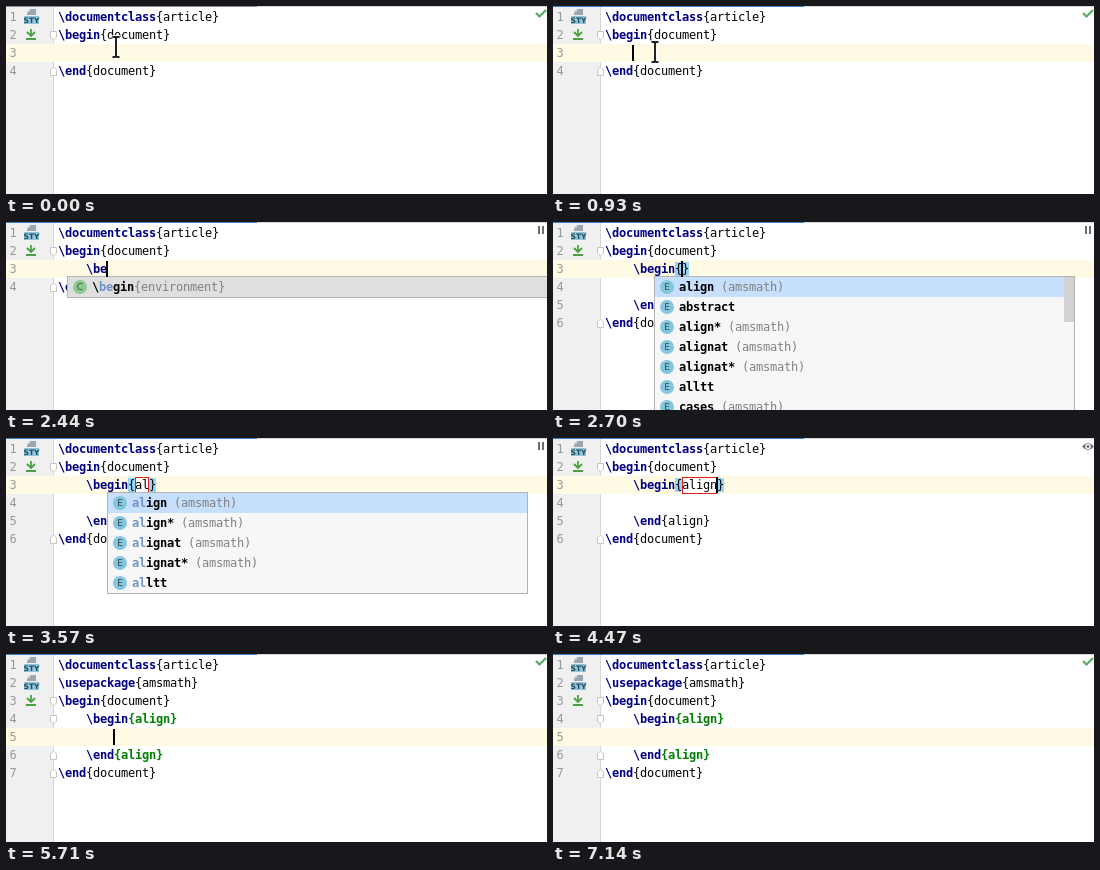
An HTML page for the animation above (7200 ms loop, 541x188 px).

```html
<!DOCTYPE html>
<html lang="en">
<head>
<meta charset="utf-8">
<title>LaTeX editor completion</title>
<style>
html, body { margin: 0; width: 541px; height: 188px; overflow: hidden; background: #fff; }
#stage { position: relative; width: 541px; height: 188px; overflow: hidden; background: #fff;
  font: 12px "DejaVu Sans Mono", monospace; letter-spacing: var(--gap, 0); color: #000; }
#stage div, #stage svg { position: absolute; }
#gutter { left: 0; top: 0; width: 47px; height: 188px; background: #f0f0f0; border-right: 1px solid #d6d6d6; }
#row { left: 0; width: 541px; height: 18px; background: #fffae3; }
#tab { left: 0; top: 0; width: 541px; height: 1px; background: #d3d9de; }
#tab div { width: 251px; height: 1px; }
.line { left: 52px; height: 18px; line-height: 18px; white-space: pre; }
.num { left: 3.5px; height: 18px; line-height: 18px; color: #999; }
b { color: #000080; }
.env { color: #008000; font-weight: bold; }
.brace { background: #99d3f5; }
.field { box-shadow: inset 0 0 0 1px #e02020; background: #fff; display: inline-block; height: 17px; line-height: 17px; }
#caret { width: 2px; height: 16px; background: #000; }
#popup { top: 54px; background: #f7f7f7; border: 1px solid #b4b4b4; box-sizing: border-box; overflow: hidden; }
.item { left: 0; width: 100%; height: 20px; line-height: 20px; white-space: pre; }
.item span { position: absolute; left: 24px; }
.item i { position: absolute; left: 5px; top: 3px; width: 14px; height: 14px; border-radius: 50%;
  font: 9px/14px "DejaVu Sans", sans-serif; letter-spacing: 0; text-align: center; color: #3a474d; }
.item b { color: #000; }
.item em { font-style: normal; color: #6f93c9; }
.item u { text-decoration: none; color: #808080; }
#bar { right: 0; top: 0; width: 10px; height: 45px; background: #d2d2d2; }
</style>
</head>
<body>
<div id="stage">
  <div id="gutter"></div>
  <div id="row"></div>
  <div id="text"></div>
  <svg id="marks" width="541" height="188"></svg>
  <div id="tab"><div></div></div>
  <div id="popup"></div>
  <div id="caret"></div>
  <svg id="mouse" width="14" height="26" viewBox="-7 -13 14 26" fill="none">
    <path id="beam" d="M-3.5-10H-1Q0-10 0-8Q0-10 1-10H3.5M0-9V9M-3.5 10H-1Q0 10 0 8Q0 10 1 10H3.5" stroke="#fff" stroke-width="4"/>
    <use href="#beam"/>
    <path d="M-3.5-10H-1Q0-10 0-8Q0-10 1-10H3.5M0-9V9M-3.5 10H-1Q0 10 0 8Q0 10 1 10H3.5" stroke="#222" stroke-width="2"/>
  </svg>
</div>
<script>
const LOOP = 7200, CELL = 7, ROW = 18;
const $ = id => document.getElementById(id);
const lineTop = i => 2 + ROW * i;

const commands = ['\\begin{environment}', '\\baselineskip', '\\baselinestretch', '\\bfseries',
  '\\bibitem[label]{citekey}', '\\bibliography{bibliographyfile}', '\\bibliographystyle{style}'];
const envs = ['align (amsmath)', 'abstract', 'align* (amsmath)', 'alignat (amsmath)',
  'alignat* (amsmath)', 'alltt', 'cases (amsmath)'];
const commandList = (items, typed) => ({ kind: 'C', x: 61, w: 500, items, typed, sel: '#dfdfdf' });
const envList = (items, typed) => ({ kind: 'E', x: 101, w: 421, items, typed, sel: '#c5dffc' });

const head = '\\documentclass{article}', open = '\\begin{document}', close = '\\end{document}';
const typing = s => [head, open, '    ' + s, close];
const block = s => [head, open, `    \\begin{${s}}`, '', `    \\end{${s}}`, close];
const finished = [head, '\\usepackage{amsmath}', open, '    \\begin{align}', '', '    \\end{align}', close];

// Each step changes only the listed properties; caret is [row, column].
const steps = [
  [0, { lines: typing(''), caret: [2, 4], folds: [1, -3], status: 'tick', tab: '#8c8c8c', popup: null, field: null, green: false }],
  [240, { tab: '#4083c9' }],
  [1200, { lines: typing('\\'), caret: [2, 5] }],
  [1300, { status: 'pause' }],
  [1600, { lines: typing('\\b'), caret: [2, 6] }],
  [1870, { lines: typing('\\be'), caret: [2, 7] }],
  [1900, { popup: commandList(commands, '\\b') }],
  [2140, { popup: commandList(commands.slice(0, 1), '\\be') }],
  [2670, { lines: block(''), caret: [2, 11], folds: [1, -5], field: '', popup: envList(envs, '') }],
  [2800, { lines: block('a'), caret: [2, 12], field: 'a', popup: envList(envs.slice(0, 6), 'a') }],
  [2940, { lines: block('al'), caret: [2, 13], field: 'al' }],
  [3070, { popup: envList(envs.filter(e => e.startsWith('al')), 'al') }],
  [4270, { lines: block('align'), caret: [2, 16], field: 'align', popup: null, status: 'eye' }],
  [4640, { lines: finished, caret: [4, 8], folds: [2, 3, -5, -6], field: null }],
  [4770, { green: true }],
  [5170, { status: 'tick' }]
];
const states = [];
for (const [at, patch] of steps) states.push({ ...states.at(-1), ...patch, at });

const blinks = [240, 770, 870, 3470, 4000, 5170, 5710, 6510];
const mousePath = [[30, 110, 41], [380, 106, 43], [730, 102, 46], [1200, 102, 46]];

function lineHtml(s, i, st) {
  const m = s.match(/^(\s*)(\\\w*)(?:\{(.*)\})?$/);
  if (!m) return s;
  const [, pad, cmd, arg] = m;
  let tail = arg === undefined ? '' : `{${arg}}`;
  if (st.field !== null && i === 2) {
    const box = arg ? `<span class="field">${arg}</span>` : '';
    tail = `<span class="brace">{</span>${box}<span class="brace">}</span>`;
  } else if (st.green && arg === 'align') tail = `<span class="env">${tail}</span>`;
  return `${pad}<b>${cmd}</b>${tail}`;
}

function itemHtml(s, i, p) {
  const [, name, rest] = s.match(/^(\\?[\w*]+)(.*)$/);
  const skip = p.kind === 'C' ? 1 : 0, n = p.typed.length;
  const label = name.slice(0, skip) + `<em>${name.slice(skip, n)}</em>` + name.slice(Math.max(n, skip));
  const fill = p.kind === 'C' ? '#8cca8f' : '#83c6df';
  return `<div class="item" style="top:${i * 20}px;${i ? '' : 'background:' + p.sel}">` +
    `<i style="background:${fill}">${p.kind}</i><span><b>${label}</b><u>${rest}</u></span></div>`;
}

const styIcon = y => `<g transform="translate(18 ${y})">
  <path d="M3 7V5L7 1H12V7Z" fill="#9aa7b0"/><path d="M3 4L6 1V4Z" fill="#c3cbd0"/>
  <rect y="8" width="15" height="8" fill="#8fc6de"/>
  <text x="7.5" y="15" text-anchor="middle" font-family="DejaVu Sans, sans-serif" font-size="7.5"
    font-weight="bold" letter-spacing="0" fill="#27495a">STY</text></g>`;
const arrowIcon = y => `<path transform="translate(25 ${y})" d="M0 2V8M-4 5L0 9L4 5M-5 12H5"
  fill="none" stroke="#4ba046" stroke-width="1.8"/>`;
const foldIcon = f => {
  const flip = f < 0 ? -1 : 1;
  return `<path transform="translate(47.5 ${lineTop(Math.abs(f)) + 9.5}) scale(1 ${flip})"
    d="M-3-4H3V1.5L0 4.5L-3 1.5Z" fill="#fff" stroke="#c6c6c6"/>`;
};
const statusIcon = {
  tick: '<path d="M530 7L533.5 10.5L540 4" fill="none" stroke="#59a869" stroke-width="2.2"/>',
  pause: '<path d="M533 4V12M537 4V12" stroke="#6e6e6e" stroke-width="2"/>',
  eye: '<path d="M529 8.5Q535 1.5 541 8.5Q535 15.5 529 8.5Z" fill="#6e6e6e"/><circle cx="535" cy="8.5" r="2.7" fill="#fff"/><circle cx="535" cy="8.5" r="1.4" fill="#6e6e6e"/>'
};

function show(st) {
  $('text').innerHTML = st.lines.map((s, i) =>
    `<div class="num" style="top:${lineTop(i)}px">${i + 1}</div>` +
    `<div class="line" style="top:${lineTop(i)}px">${lineHtml(s, i, st)}</div>`).join('');
  const begin = st.lines.indexOf(open);
  $('marks').innerHTML = st.lines.slice(0, begin).map((_, i) => styIcon(lineTop(i))).join('') +
    arrowIcon(lineTop(begin) + 1) + st.folds.map(foldIcon).join('') + statusIcon[st.status];
  $('row').style.top = lineTop(st.caret[0]) + 'px';
  $('tab').firstChild.style.background = st.tab;
  $('caret').style.left = 51 + CELL * st.caret[1] + 'px';
  $('caret').style.top = lineTop(st.caret[0]) + 1 + 'px';
  const p = st.popup, box = $('popup');
  box.style.display = p ? 'block' : 'none';
  if (!p) return;
  box.style.left = p.x + 'px';
  box.style.width = p.w + 'px';
  box.style.height = p.items.length * 20 + 2 + 'px';
  box.innerHTML = p.items.map((s, i) => itemHtml(s, i, p)).join('') +
    (p.items.length > 6 ? '<div id="bar"></div>' : '');
}

function moveMouse(t) {
  $('mouse').style.display = t < 1200 ? 'block' : 'none';
  let k = mousePath.findIndex(p => p[0] > t);
  if (k < 0) return;
  const b = mousePath[k], a = mousePath[Math.max(k - 1, 0)];
  const f = b === a ? 0 : (t - a[0]) / (b[0] - a[0]);
  $('mouse').style.left = Math.round(a[1] + (b[1] - a[1]) * f) - 7 + 'px';
  $('mouse').style.top = Math.round(a[2] + (b[2] - a[2]) * f) - 13 + 'px';
}

// Keep the code on a whole-pixel character grid.
function setGrid() {
  const probe = document.createElement('span');
  probe.textContent = 'm'.repeat(40);
  $('stage').append(probe);
  const width = probe.getBoundingClientRect().width / 40;
  probe.remove();
  $('stage').style.setProperty('--gap', CELL - width + 'px');
}

let current = null;
const start = performance.now();
function frame() {
  const t = (performance.now() - start) % LOOP;
  const st = states.findLast(s => s.at <= t);
  if (st !== current) show(current = st);
  $('caret').style.display = blinks.filter(b => b <= t).length % 2 ? 'block' : 'none';
  moveMouse(t);
  requestAnimationFrame(frame);
}
setGrid();
frame();
</script>
</body>
</html>
```
